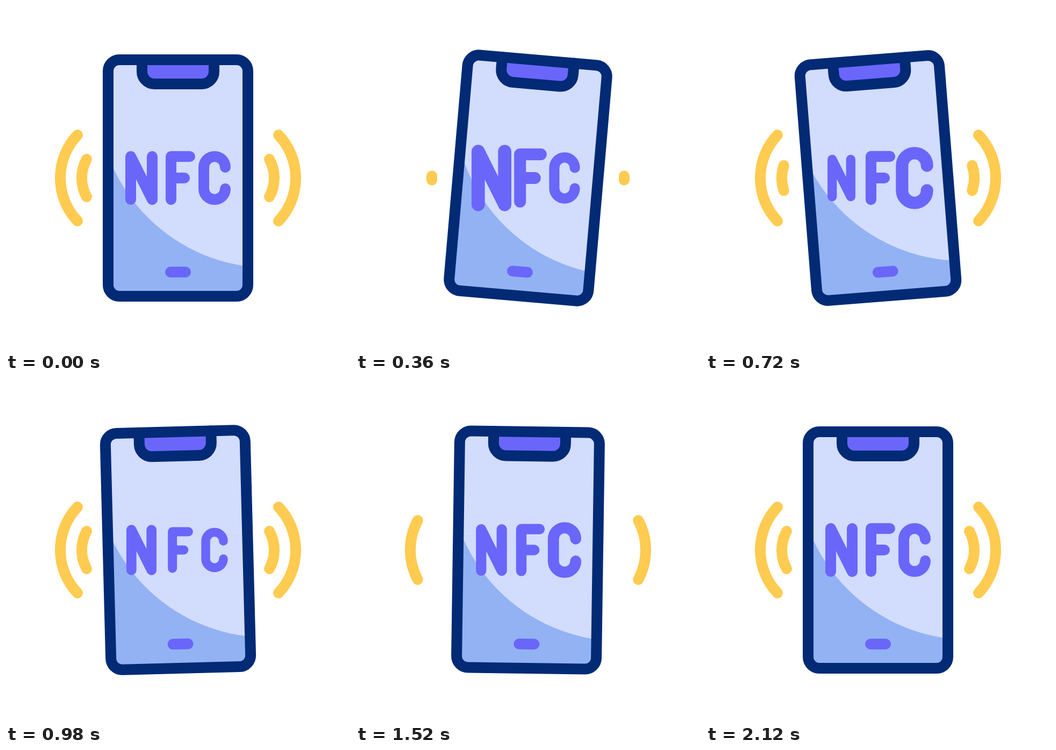
An HTML page with a canvas that plays this animation: 640x640 px, repeating every 2.4 s.

```html
<!DOCTYPE html>
<html lang="en">
<head>
<meta charset="utf-8">
<title>NFC phone</title>
<style>
  html, body { margin: 0; width: 100%; height: 100%; overflow: hidden; background: #fff; }
  canvas { display: block; width: 100vw; height: 100vh; }
</style>
</head>
<body>
<canvas id="stage" width="640" height="640"></canvas>
<script>
const ctx = document.getElementById('stage').getContext('2d');
const NAVY = '#022a75', LIGHT = '#d2dcfd', BLUE = '#93b2f3', PURPLE = '#6a66fa', YELLOW = '#ffcb50';
const LOOP = 2400, TICK = 20;

// Keys are [tick, value] pairs, eased in and out between neighbours.
const TILT = [[0, 0], [17, 5], [39, -5], [64, 5], [91, -5], [106, 0]];
const BOUNCE = [[0, 1], [5, 0.92], [20, 1.25], [40, 0.82], [60, 1.09], [74, 0.955], [85, 1]];
const OUTER = [[0, 1], [10, 0], [20, 0], [30, 1]];
const INNER = [[10, 1], [20, 0], [30, 0], [40, 1]];

const LETTERS = [
  { x: 252, lag: 0, path: new Path2D('M232 360V280L272 360V280') },
  { x: 324.5, lag: 5, path: new Path2D('M307 360V280H342M307 320H332') },
  { x: 388, lag: 10, path: new Path2D('M408 300A20 20 0 0 0 368 300V340A20 20 0 0 0 408 340') }
];
const NOTCH = new Path2D('M253 100V122A23 23 0 0 0 276 145H364A23 23 0 0 0 387 122V100');
const HOME = new Path2D('M306 495H334');
const BODY = new Path2D();
BODY.roundRect(190, 100, 260, 440, 21);

const smooth = p => p * p * (3 - 2 * p);

function track(keys, t) {
  if (t <= keys[0][0]) return keys[0][1];
  for (let i = 1; i < keys.length; i++) {
    const [t0, a] = keys[i - 1], [t1, b] = keys[i];
    if (t < t1) return a + (b - a) * smooth((t - t0) / (t1 - t0));
  }
  return keys[keys.length - 1][1];
}

function stroke(path, color) {
  ctx.strokeStyle = color;
  ctx.stroke(path);
}

function fill(path, color) {
  ctx.fillStyle = color;
  ctx.fill(path);
}

// A pair of mirrored arcs, trimmed towards their middles.
function waves(offset, radius, spread, amount) {
  if (amount < 0.001) return;
  const half = spread * amount * Math.PI / 180;
  for (const side of [0, Math.PI]) {
    const arc = new Path2D();
    const cx = 320 + Math.cos(side) * (offset - radius);
    arc.arc(cx, 320, radius, side - half, side + half);
    stroke(arc, YELLOW);
  }
}

function phone(angle) {
  ctx.save();
  ctx.translate(320, 320);
  ctx.rotate(angle * Math.PI / 180);
  ctx.translate(-320, -320);
  fill(BODY, LIGHT);
  ctx.save();
  ctx.clip(BODY);
  const shade = new Path2D();
  shade.rect(180, 90, 280, 460);
  shade.arc(490, 167, 320, 0, Math.PI * 2);
  ctx.beginPath();
  ctx.rect(180, 295, 280, 260);
  ctx.clip();
  ctx.fillStyle = BLUE;
  ctx.fillRect(180, 295, 280, 260);
  ctx.beginPath();
  ctx.arc(490, 167, 320, 0, Math.PI * 2);
  ctx.fillStyle = LIGHT;
  ctx.fill();
  ctx.restore();
  fill(NOTCH, PURPLE);
  stroke(NOTCH, NAVY);
  stroke(BODY, NAVY);
  stroke(HOME, PURPLE);
  ctx.restore();
}

function letter({ x, lag, path }, tick) {
  const s = track(BOUNCE, tick - lag);
  ctx.save();
  ctx.translate(x, 320);
  ctx.scale(s, s);
  ctx.translate(-x, -320);
  stroke(path, PURPLE);
  ctx.restore();
}

function draw(tick) {
  ctx.fillStyle = '#fff';
  ctx.fillRect(0, 0, 640, 640);
  ctx.lineWidth = 20;
  ctx.lineCap = ctx.lineJoin = 'round';
  const pulse = tick < 100 ? tick % 50 : 50;
  waves(219, 116, 43.6, track(OUTER, pulse));
  waves(179, 72.6, 28.8, track(INNER, pulse));
  phone(track(TILT, tick));
  for (const l of LETTERS) letter(l, tick);
}

const start = performance.now();
function loop() {
  const t = (performance.now() - start) % LOOP;
  draw(Math.floor(t / TICK));
  requestAnimationFrame(loop);
}
loop();
</script>
</body>
</html>
```
